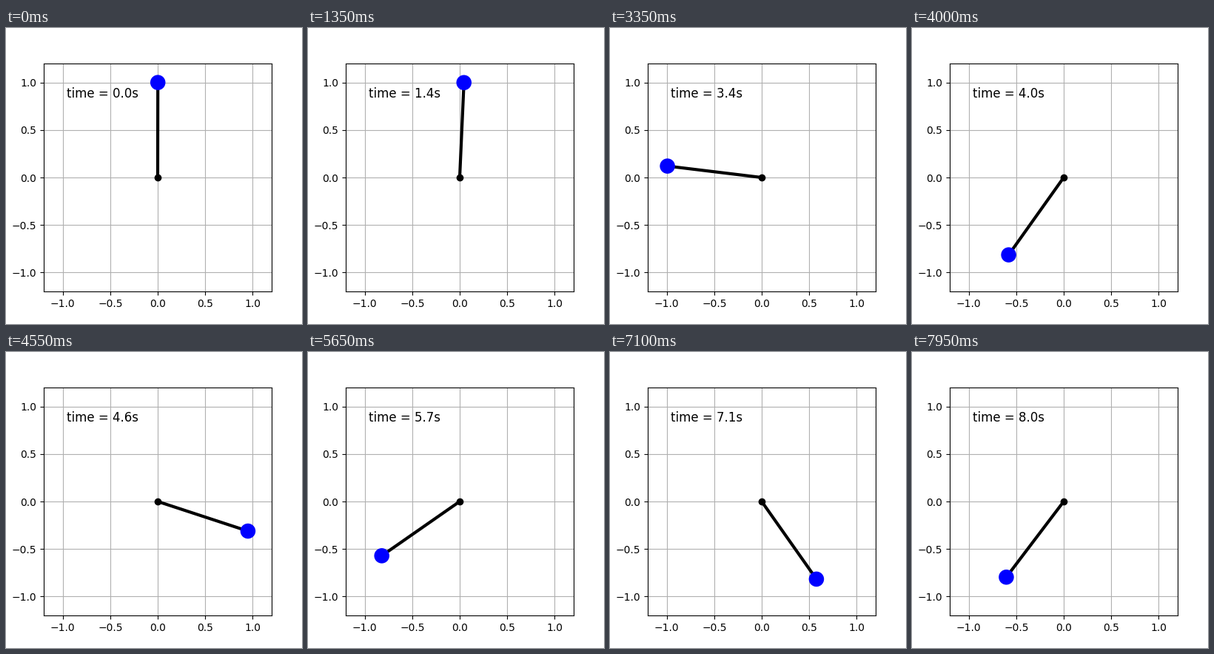
Write a matplotlib script that moves like this. It is 400 px wide and 400 px high and loops after 8 s.

```python
import numpy as np
import matplotlib.pyplot as plt
from matplotlib.animation import FuncAnimation

G, LENGTH, DAMPING = 9.8, 1.0, 0.418
THETA0 = 3.14          # measured from hanging down, almost upright
FRAMES, INTERVAL = 160, 50
SUBSTEPS = 20

# 400 samples over 20 s, of which the first 8 s are shown
times = np.linspace(0, 20, 400)[:FRAMES]


def rate(state):
    theta, omega = state
    return np.array([omega, -G / LENGTH * np.sin(theta) - DAMPING * omega])


def rk4(state, h):
    k1 = rate(state)
    k2 = rate(state + h / 2 * k1)
    k3 = rate(state + h / 2 * k2)
    k4 = rate(state + h * k3)
    return state + h / 6 * (k1 + 2 * k2 + 2 * k3 + k4)


def swing():
    h = (times[1] - times[0]) / SUBSTEPS
    state = np.array([THETA0, 0.0])
    angles = [state[0]]
    for _ in times[1:]:
        for _ in range(SUBSTEPS):
            state = rk4(state, h)
        angles.append(state[0])
    return np.array(angles)


theta = swing()
xs, ys = LENGTH * np.sin(theta), -LENGTH * np.cos(theta)

fig, ax = plt.subplots(figsize=(4, 4), dpi=100)
ax.set_xlim(-1.2, 1.2)
ax.set_ylim(-1.2, 1.2)
ax.set_aspect("equal")
ax.set_xticks(np.arange(-1, 1.1, 0.5))
ax.set_yticks(np.arange(-1, 1.1, 0.5))
ax.grid()

rod, = ax.plot([], [], "o-", color="black", lw=3)
bob = ax.add_patch(plt.Circle((xs[0], ys[0]), 0.08, fc="blue", zorder=3))
clock = ax.text(0.1, 0.85, "", transform=ax.transAxes, fontsize=12)


def update(i):
    rod.set_data([0, xs[i]], [0, ys[i]])
    bob.set_center((xs[i], ys[i]))
    clock.set_text(f"time = {times[i]:.1f}s")
    return rod, bob, clock


anim = FuncAnimation(fig, update, frames=FRAMES, interval=INTERVAL,
                     repeat=True, repeat_delay=0)
plt.show()
```
